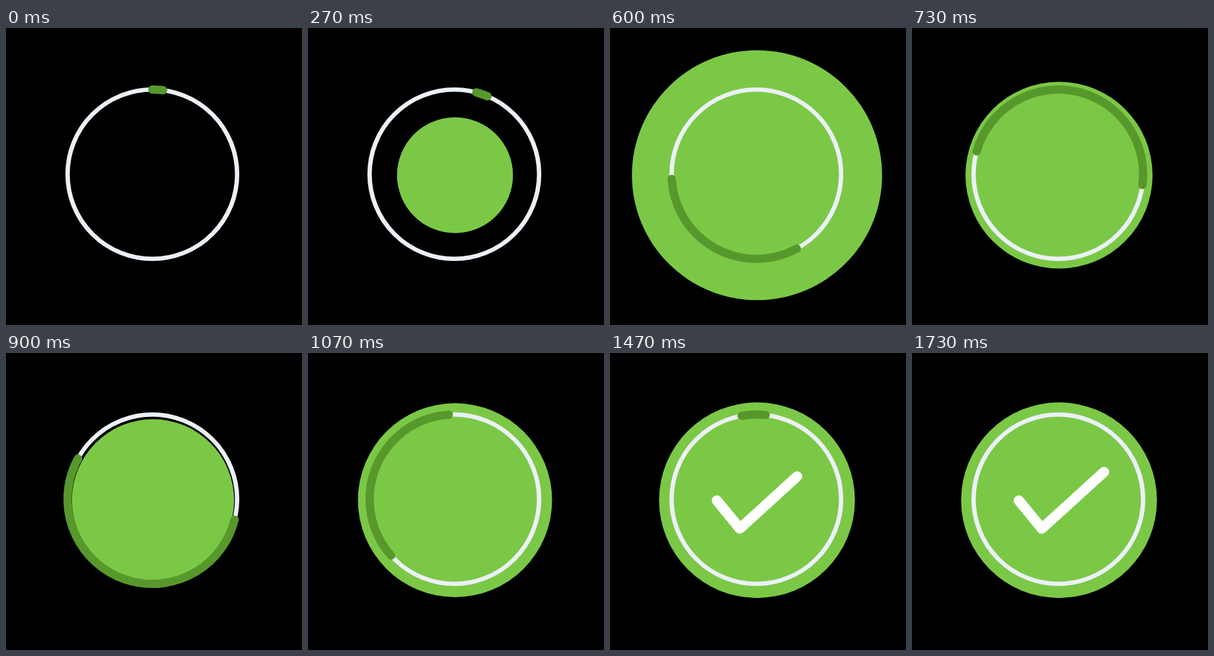
These frames come from a looping animation (448x450 px, 1.76 s). An HTML page:

```html
<!DOCTYPE html>
<html lang="en">
<head>
<meta charset="utf-8">
<title>Success check</title>
<style>
  html, body { margin: 0; width: 100%; height: 100%; overflow: hidden; background: #000; }
  svg { display: block; width: 448px; height: 450px; }
  .line { fill: none; stroke-linecap: round; stroke-linejoin: round; }
</style>
</head>
<body>
<svg viewBox="0 0 448 450">
  <circle id="disc" cx="222.5" cy="223" r="0" fill="#7bc846"/>
  <circle class="line" cx="221.5" cy="221.5" r="128.3" stroke="#ebf0f6" stroke-width="6.6"/>
  <circle id="arc" class="line" cx="221.5" cy="221.5" r="128.3" stroke="#57982c" stroke-width="12.6" pathLength="360"/>
  <path id="tick" class="line" d="M161.7 223.5 L196.5 266 L290.7 180.3" stroke="#fff" stroke-width="15.5" pathLength="1"/>
</svg>
<script>
const LOOP = 1760, STEP = 100 / 3, LAST = 52;
const [disc, arc, tick] = ['disc', 'arc', 'tick'].map(id => document.getElementById(id));

// [step, value] keys
const radius = [[0, 0], [17, 192.5], [25, 118], [33, 148.2]];
const tail = [[0, 0], [8, 15], [12, 42], [18, 151.5], [27, 464], [38, 681.7], [48, 718.5], [52, 721]];
const head = [[0, 7.3], [8, 23], [12, 90], [18, 266.7], [27, 658.7], [33, 720], [38, 725.7], [52, 726.6]];

function ease(f, from, to) {
  const u = Math.min(1, Math.max(0, (f - from) / (to - from)));
  return u * u * (3 - 2 * u);
}

function easedKeys(keys, f) {
  let value = keys[0][1];
  for (let i = 1; i < keys.length; i++) {
    value += (keys[i][1] - keys[i - 1][1]) * ease(f, keys[i - 1][0], keys[i][0]);
  }
  return value;
}

// Monotone cubic curve through the keys
function curve(keys, f) {
  const gap = i => keys[i + 1][0] - keys[i][0];
  const rise = i => (keys[i + 1][1] - keys[i][1]) / gap(i);
  const slope = i => {
    if (i === 0) return rise(0) * 0.2;
    if (i === keys.length - 1) return 0;
    const a = 2 * gap(i) + gap(i - 1), b = gap(i) + 2 * gap(i - 1);
    return (a + b) / (a / rise(i - 1) + b / rise(i));
  };
  let i = 0;
  while (i < keys.length - 2 && f >= keys[i + 1][0]) i++;
  const h = gap(i), u = (f - keys[i][0]) / h, v = 1 - u;
  return keys[i][1] * v * v * (1 + 2 * u) + keys[i + 1][1] * u * u * (3 - 2 * u)
    + h * u * v * (slope(i) * v - slope(i + 1) * u);
}

function draw(f) {
  disc.setAttribute('r', easedKeys(radius, f));

  const start = curve(tail, f), length = curve(head, f) - start;
  arc.setAttribute('stroke-dasharray', `${length} ${360 - length}`);
  arc.setAttribute('transform', `rotate(${start - 90} 221.5 221.5)`);
  arc.style.display = f < LAST ? '' : 'none';

  const drawn = ease(f, 32, 46);
  tick.setAttribute('stroke-dasharray', drawn < 1 ? `${drawn} 2` : 'none');
  tick.style.display = drawn > 0 ? '' : 'none';
}

const begin = performance.now();
function tickTime() {
  const t = (performance.now() - begin) % LOOP;
  draw(Math.min(LAST, Math.floor((t + 4) / STEP)));
  requestAnimationFrame(tickTime);
}
tickTime();
</script>
</body>
</html>
```
